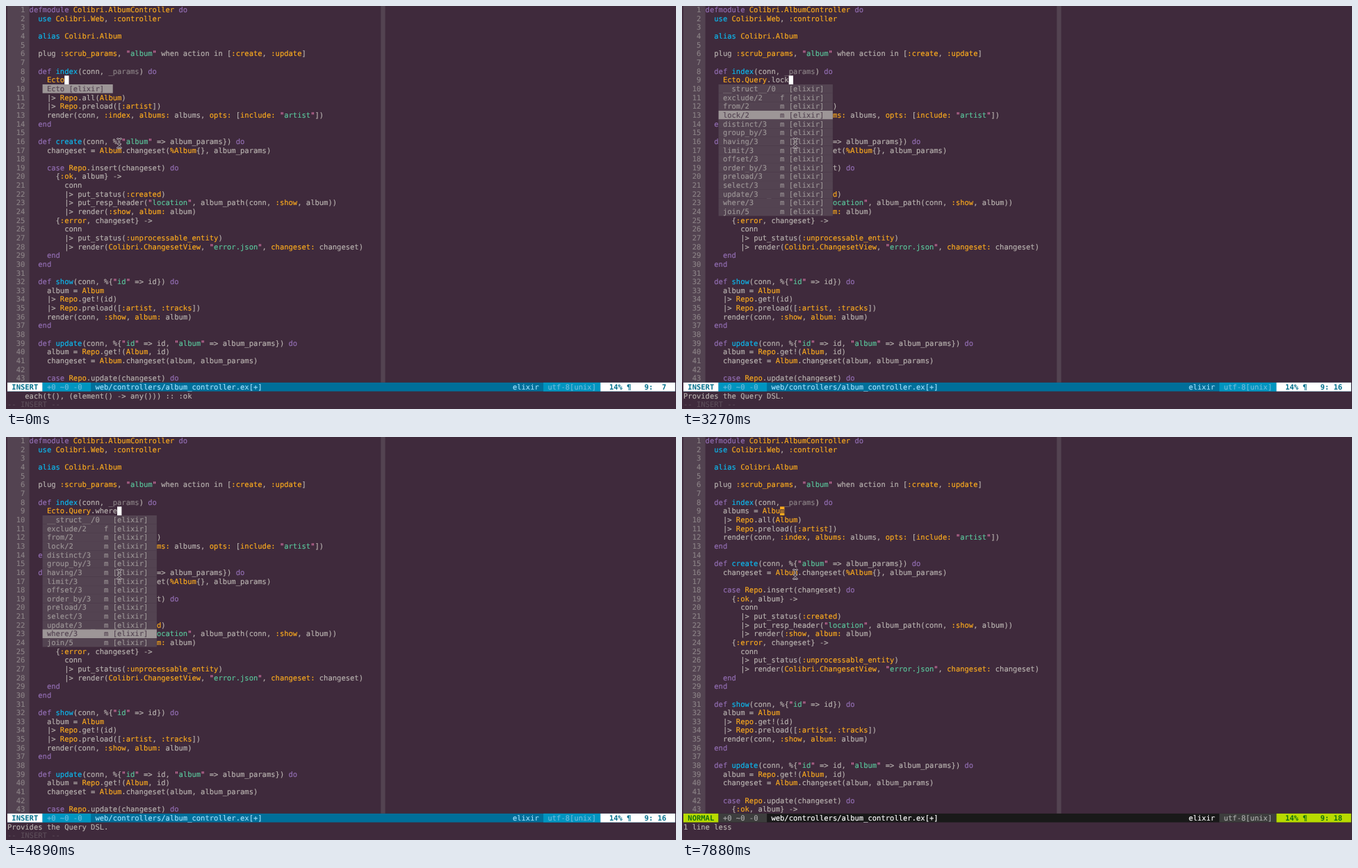
These frames come from a looping animation (964x581 px, 8 s). An HTML page:

```html
<!DOCTYPE html>
<html lang="en">
<head>
<meta charset="utf-8">
<title>Editor completion</title>
<style>
  html, body { margin: 0; width: 100%; height: 100%; overflow: hidden; background: #3f2a3c; }
  svg { display: block; width: 964px; height: 581px; }
  text {
    font: 10.5px "DejaVu Sans Mono", monospace;
    white-space: pre;
    text-rendering: geometricPrecision;
    stroke-width: .15px;
  }
  .bold { font-weight: bold; stroke: none; }
</style>
</head>
<body>
<svg id="stage" viewBox="0 0 964 581">
  <g id="screen"></g>
  <g fill="none" stroke-linecap="round">
    <path id="beam" d="M160.5 191.5q2.5 0 2.5 2v9q0 2-2.5 2M165.5 191.5q-2.5 0-2.5 2M165.5 204.500q-2.5 0-2.500-2M161.500 199h3" stroke="#d8d0d4" stroke-width="2.2"/>
    <use href="#beam"/>
    <path d="M160.5 191.5q2.5 0 2.5 2v9q0 2-2.5 2M165.5 191.5q-2.5 0-2.5 2M165.5 204.500q-2.5 0-2.500-2M161.500 199h3" stroke="#241a23" stroke-width="1"/>
  </g>
</svg>
<script>
const LOOP = 8000, CW = 6.321, RH = 12.644, LEFT = 2, GUTTER = 5, EDIT_ROW = 8;
const C = {
  bg: '#3f2a3c', panel: '#534351', number: '#8b8286', text: '#b9b3b0', dim: '#8b8286',
  purple: '#946fb5', cyan: '#0cbaf0', orange: '#fcab1e', green: '#5ac79c', pink: '#ec7fb4',
  menu: '#9d9697', faint: '#5d4e5a', cursor: '#ffffff'
};
const THEMES = {
  INSERT: { a: ['#ffffff', '#006f8c'], b: ['#0095c0', '#6fbbdd'], c: ['#006f9a', '#a2e1ff'] },
  NORMAL: { a: ['#b8db00', '#156f10'], b: ['#3d3d3d', '#acacac'], c: ['#191919', '#ffffff'] }
};

const CODE = `defmodule Colibri.AlbumController do
  use Colibri.Web, :controller

  alias Colibri.Album

  plug :scrub_params, "album" when action in [:create, :update]

  def index(conn, _params) do
    albums = Album
    |> Repo.all(Album)
    |> Repo.preload([:artist])
    render(conn, :index, albums: albums, opts: [include: "artist"])
  end

  def create(conn, %{"album" => album_params}) do
    changeset = Album.changeset(%Album{}, album_params)

    case Repo.insert(changeset) do
      {:ok, album} ->
        conn
        |> put_status(:created)
        |> put_resp_header("location", album_path(conn, :show, album))
        |> render(:show, album: album)
      {:error, changeset} ->
        conn
        |> put_status(:unprocessable_entity)
        |> render(Colibri.ChangesetView, "error.json", changeset: changeset)
    end
  end

  def show(conn, %{"id" => id}) do
    album = Album
    |> Repo.get!(id)
    |> Repo.preload([:artist, :tracks])
    render(conn, :show, album: album)
  end

  def update(conn, %{"id" => id, "album" => album_params}) do
    album = Repo.get!(Album, id)
    changeset = Album.changeset(album, album_params)

    case Repo.update(changeset) do
      {:ok, album} ->`.split('\n');

const FUNCS = ('__struct__/0 exclude/2 from/2 lock/2 distinct/3 group_by/3 having/3 limit/3 ' +
  'offset/3 order_by/3 preload/3 select/3 update/3 where/3 join/5').split(' ');
const FUNC_MENU = FUNCS.map((f, i) =>
  ` ${f.padEnd(13)}${i === 0 ? ' ' : i === 1 ? 'f' : 'm'} [elixir]  `);
const moduleMenu = names => names.map(n => ` ${n} [elixir]  `);

// Each step inherits whatever it does not change.
const STEPS = [];
function step(at, change) {
  STEPS.push({ ...STEPS[STEPS.length - 1], at, ...change });
}
step(0, { mode: 'INSERT', line: 'Ecto', menu: moduleMenu(['Ecto']), sel: 0, pos: ' 7',
  msg: '    each(t(), (element() -> any())) :: :ok', cursor: null, match: null });
step(140, { line: 'Ecto.', menu: [], sel: -1, pos: '10', msg: 'Ecto is split into 4 main components:' });
step(290, { menu: moduleMenu(['Ecto.Model', 'Ecto.Query']) });
step(440, { line: 'Ecto.Q', menu: moduleMenu(['Ecto.Query']) });
step(890, { line: 'Ecto.Query', sel: 0 });
step(1330, { line: 'Ecto.Query.', menu: [], sel: -1, pos: '16', msg: 'Provides the Query DSL.' });
step(1930, { menu: FUNC_MENU });
[[2530, 0], [2830, 1], [2980, 2], [3270, 3], [3570, 4], [3710, 5], [3860, 6], [4000, 7],
 [4150, 8], [4290, 10], [4440, 11], [4740, 12], [4890, 13]].forEach(([at, sel]) =>
  step(at, { sel, line: 'Ecto.Query.' + FUNCS[sel].split('/')[0] }));
step(5790, { line: 'Ecto.Query.where()', menu: [], sel: -1, pos: '22',
  msg: 'A where query expression.', cursor: 21, match: 20 });
step(7130, { mode: 'NORMAL', pos: '21', cursor: 20, match: 21 });
step(7880, { line: null, pos: '18', msg: '1 line less', cursor: 17, match: null });

const escapeText = s => s.replace(/&/g, '&amp;').replace(/</g, '&lt;');
const colX = col => LEFT + col * CW;
const rowY = row => row * RH - 0.8;

function box(row, col, cols, fill, rows = 1) {
  return `<rect x="${colX(col).toFixed(2)}" y="${rowY(row).toFixed(2)}" ` +
    `width="${(cols * CW).toFixed(2)}" height="${(rows * RH).toFixed(2)}" fill="${fill}"/>`;
}
function label(row, col, s, fill, cls = '') {
  if (!s.trim()) return '';
  return `<text class="${cls}" x="${colX(col).toFixed(2)}" y="${(row * RH + 9.2).toFixed(2)}" ` +
    `fill="${fill}" stroke="${fill}">${escapeText(s)}</text>`;
}

function tokenColor(word, before) {
  if (/^(defmodule|def|do|case|end)$/.test(word)) return C.purple;
  if (/^(use|alias)$/.test(word) || /def $/.test(before)) return C.cyan;
  if (/^(:\w|%?[A-Z])|\w:$/.test(word)) return C.orange;
  return word === '_params' ? C.dim : C.text;
}
function codeLine(row, s) {
  const tokens = /"[^"]*"|:\w+|\w+:(?= )|%?[A-Z]\w*(?:\.[A-Z]\w*)*|\w+|[^\w\s]/g;
  let out = '';
  for (const { 0: word, index } of s.matchAll(tokens)) {
    const col = GUTTER + index;
    if (word[0] === '"') {
      out += label(row, col, '"', C.pink) + label(row, col + 1, word.slice(1, -1), C.green) +
        label(row, col + word.length - 1, '"', C.pink);
    } else {
      out += label(row, col, word, tokenColor(word, s.slice(0, index)));
    }
  }
  return out;
}

function menuBox({ menu, sel }) {
  return menu.map((item, i) => {
    const row = EDIT_ROW + 1 + i, on = i === sel;
    return box(row, 8, item.length, on ? C.menu : C.panel) +
      label(row, 8, item, on ? C.panel : C.menu);
  }).join('');
}

function statusBar({ mode, pos }) {
  const { a, b, c } = THEMES[mode], row = 43;
  return box(row, 0, 152, c[0]) + box(row, 0, 8, a[0]) + box(row, 8, 11, b[0]) +
    box(row, 122, 13, b[0]) + box(row, 135, 17, a[0]) +
    label(row, 1, mode, a[1], 'bold') +
    label(row, 9, '+0 ~0 -0', b[1]) +
    label(row, 20, 'web/controllers/album_controller.ex[+]', c[1]) +
    label(row, 115, 'elixir', c[1]) +
    label(row, 123, 'utf-8[unix]', b[1]) +
    label(row, 137, '14% ¶   9: ' + pos, a[1], 'bold');
}

function cursorBox(s, line) {
  const at = s.cursor ?? line.length, col = GUTTER + at;
  const fill = s.mode === 'INSERT' ? C.cursor : s.line ? C.text : C.orange;
  let out = '';
  if (s.match !== null) {
    out += box(EDIT_ROW, GUTTER + s.match, 1, C.number) +
      label(EDIT_ROW, GUTTER + s.match, line[s.match], C.bg);
  }
  return out + box(EDIT_ROW, col, 1, fill) + label(EDIT_ROW, col, line[at] || '', C.bg);
}

function draw(s) {
  const lines = CODE.slice();
  if (s.line) lines.splice(EDIT_ROW, 0, '    ' + s.line);
  let out = `<rect width="964" height="581" fill="${C.bg}"/>` +
    box(0, 0, GUTTER, C.panel, 43) + box(0, 85, 1, C.panel, 43);
  for (let row = 0; row < 43; row++) {
    out += label(row, row < 9 ? 3 : 2, String(row + 1), C.number) + codeLine(row, lines[row]);
  }
  out += cursorBox(s, lines[EDIT_ROW]) + menuBox(s) + statusBar(s) + label(44, 0, s.msg, C.text);
  if (s.mode === 'INSERT') out += label(45, 0, '-- INSERT --', C.faint);
  return out;
}

const screenGroup = document.getElementById('screen');
const start = performance.now();
let shown = null;
function tick() {
  const t = Math.max(0, performance.now() - start) % LOOP;
  const current = STEPS.filter(s => s.at <= t).pop();
  if (current !== shown) {
    shown = current;
    screenGroup.innerHTML = draw(current);
  }
  requestAnimationFrame(tick);
}
tick();
</script>
</body>
</html>
```
